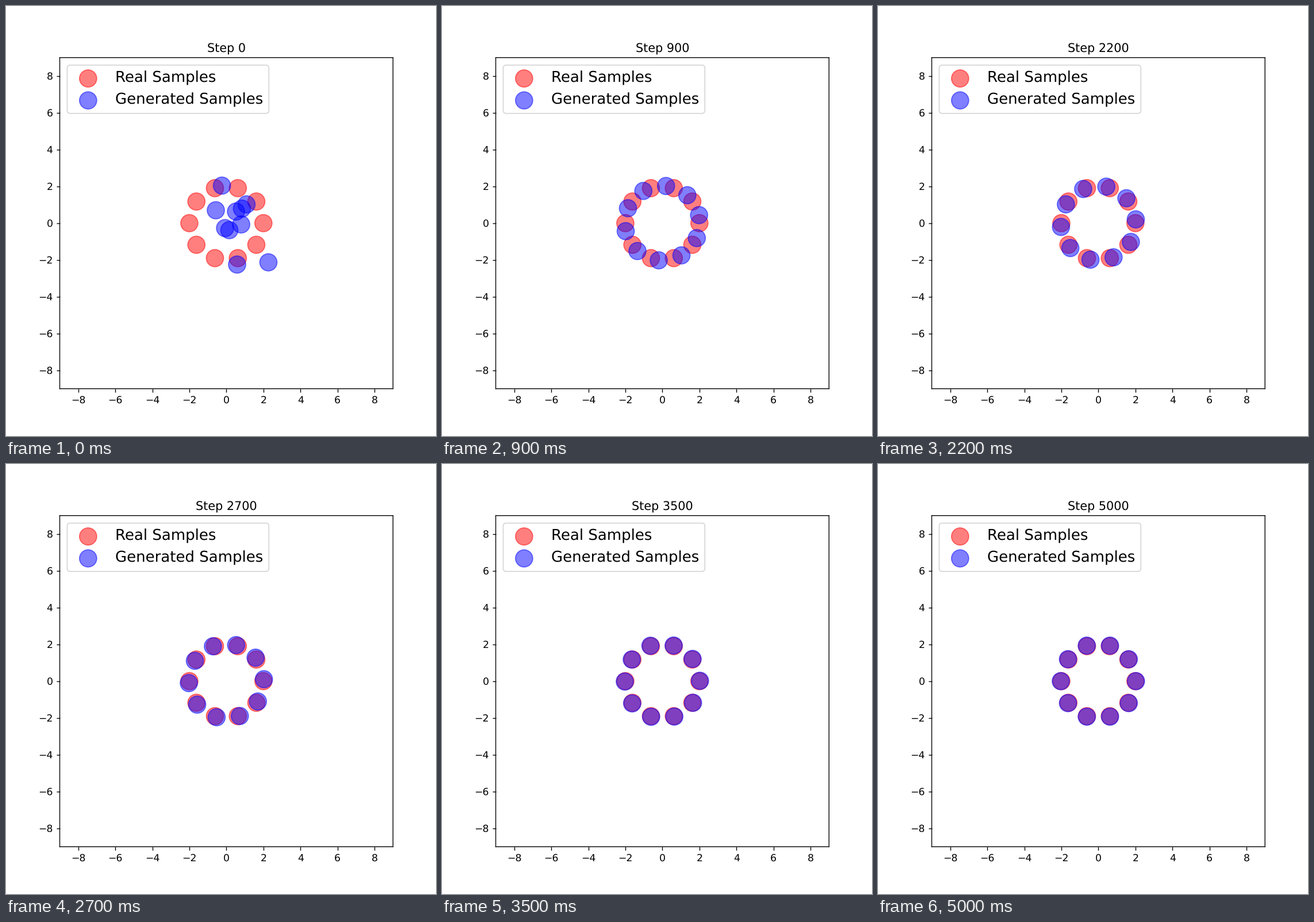
A matplotlib script that plays this animation: 748x748 px, repeating every 5.1 s.

```python
import numpy as np
import matplotlib.pyplot as plt
from matplotlib.animation import FuncAnimation

SIZE = 748
FRAMES = 51
STEP = 100
N = 10

# Unsnapped lines and unhinted glyphs keep everything at sub-pixel positions.
plt.rcParams.update({
    "font.family": "DejaVu Sans",
    "path.snap": False,
    "text.hinting": "none",
})

# Starting cloud, in the order of the ring slots the points settle into.
START = np.array([
    (1.09, 1.02), (0.84, 0.79), (0.52, 0.63), (-0.24, 2.04), (-0.57, 0.70),
    (-0.07, -0.27), (0.16, -0.38), (0.58, -2.25), (2.27, -2.13), (0.80, -0.07),
])


def ring(radius, lag=0.0):
    angle = 2 * np.pi * np.arange(N) / N + np.radians(lag)
    return radius * np.column_stack([np.cos(angle), np.sin(angle)])


def decay(step, scale, power):
    return np.exp(-(step / scale) ** power)


def generated(step):
    """Spread from the starting cloud to the ring, then turn into place."""
    goal = ring(2.03, 13.2 * decay(step, 2354, 2.9))
    return goal + (START - goal) * decay(step, 250, 1.5)


def scatter(points, color, label):
    # One colour per point draws each dot at its exact position.
    return ax.scatter(*points.T, s=300, c=[color] * N, alpha=0.5, label=label)


fig, ax = plt.subplots(figsize=(6, 6), dpi=SIZE / 6)
ax.set(xlim=(-9, 9), ylim=(-9, 9),
       xticks=range(-8, 9, 2), yticks=range(-8, 9, 2))
scatter(ring(2), "red", "Real Samples")
dots = scatter(START, "blue", "Generated Samples")
ax.legend(loc="upper left", fontsize=15)
title = ax.set_title("Step 0")


def update(frame):
    step = frame * STEP
    dots.set_offsets(generated(step))
    title.set_text(f"Step {step}")
    return dots, title


anim = FuncAnimation(fig, update, frames=FRAMES, interval=100, repeat=True)
plt.show()
```
